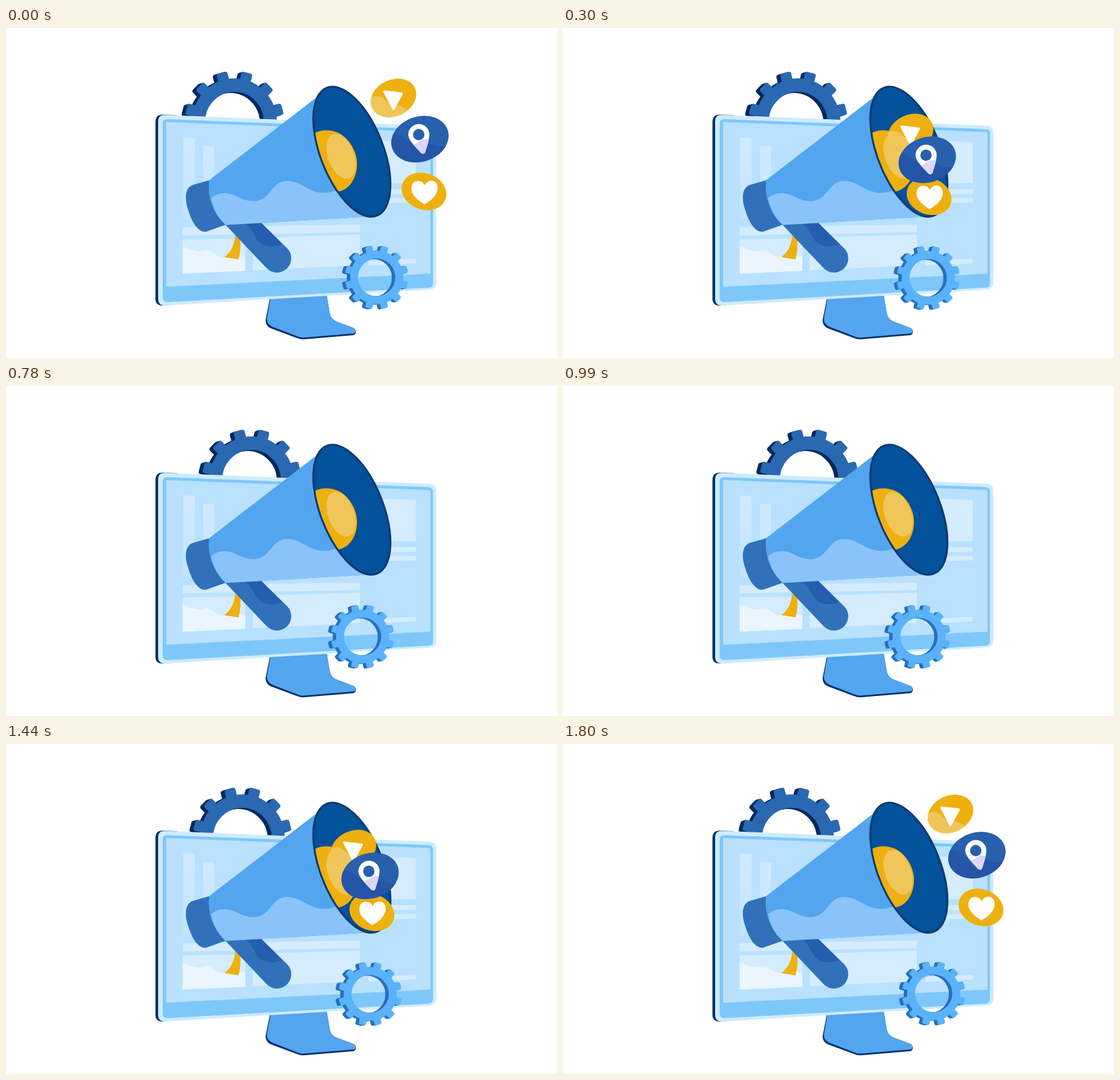
Write an HTML page that moves like this. It is 967 px wide and 579 px high and loops after 1.83 s.

```html
<!DOCTYPE html>
<html lang="en">
<head>
<meta charset="utf-8">
<title>Megaphone</title>
<style>
  html, body { margin: 0; width: 100%; height: 100%; overflow: hidden; background: #fff; }
  svg { display: block; width: 100%; height: 100%; }
</style>
</head>
<body>
<svg viewBox="0 0 967 579">
  <defs>
    <linearGradient id="fade" x2="0" y2="1">
      <stop offset="0" stop-color="#d0eafe"/>
      <stop offset="1" stop-color="#c1e4ff"/>
    </linearGradient>
    <clipPath id="playDisc"><ellipse cx="680" cy="122.7" rx="41.6" ry="32" transform="rotate(-25 680 122.7)"/></clipPath>
    <clipPath id="pinDisc"><ellipse cx="726.5" cy="195" rx="51.3" ry="39.7" transform="rotate(-18 726.5 195)"/></clipPath>
    <clipPath id="pinShape"><path id="pin" d="M706 188A18.5 18.5 0 0 1 743 186C743 196 738 210 736 217Q734 223 728 219C721 210 707 199 706 188Z"/></clipPath>
    <clipPath id="aboveHorn"><path d="M0 0H967V579H640V331L385 344H0Z"/></clipPath>
  </defs>

  <g id="bigGear"></g>

  <!-- stand -->
  <path d="M463 475L563 470L568 500Q570 511 580 515L609 526Q614 528 614 533Q614 538 609 539L525 546Q518 547 511 544L465 527Q456 523 455.500 513Z" fill="#00306b"/>
  <path d="M464 475L563 470L568 500Q570 511 580 515L609 526Q614 528 613.500 532Q613 536 609 536L525 543Q518 544 511 541L467 524Q457 519 458 509Z" fill="#52a5ee"/>

  <!-- monitor -->
  <path d="M275 152Q262.300 152 262.300 165V475Q262.300 487 275 487L300 485V153Z" fill="#00306b"/>
  <path d="M279 152.500L742 171.500Q755.300 172 755.300 184V446Q755.300 458 743 459L280 487Q267 487.500 267 475V164Q267 152 279 152.500Z" fill="#cdebfe"/>
  <path d="M283 160L742 177.500Q749.500 178 749.500 185V448Q749.500 455 742 455.500L283 481Q275 481 275 473V167Q275 160 283 160Z" fill="#7ec7fb"/>
  <path d="M281 165L742 182.500Q745 183 745 186V431L281 454Z" fill="#b9e1ff"/>
  <g fill="#d4ecfe">
    <path d="M311 192L331 193V334L311 335Z" fill="url(#fade)"/>
    <path d="M346 207L365 208V332L346 333Z" fill="url(#fade)"/>
    <path d="M640 197L719 200V272L640 273Z"/>
    <path d="M640 283L719 283V291L640 292ZM640 299L719 298V306L640 308Z"/>
    <path d="M310 349.500L621 345V358L310 364Z"/>
    <path d="M310 371L420 369V426L310 431ZM433 368L621 362.500V416L433 425Z"/>
    <path d="M636 409L719 405V413L636 417Z"/>
  </g>
  <path d="M310 384C318 383 321 390 328 390S337 394 345 391S359 391 364 395S376 404 386 401S405 398 420 402V426L310 431Z" fill="#eaf5ff"/>

  <g id="smallGear"></g>

  <!-- trigger and handle -->
  <path d="M402 365L411 368Q413 389 408 406L383 402Q400 390 402 365Z" fill="#edb00f"/>
  <path d="M384 344L447 341L494 387A24.800 24.800 0 0 1 457 421Z" fill="#3071ba"/>
  <path d="M419 343L447 341L485 379C472 385 455 385 445 376C433 365 436 354 419 343Z" fill="#255eae"/>

  <!-- bell interior -->
  <ellipse cx="607" cy="217" rx="55.2" ry="120.5" transform="rotate(-21.4 607 217)" fill="#02519b" stroke="#0e3b70" stroke-width="3.4"/>
  <path d="M542 184C559 176 580 179 594 191C608 204 617 222 616 241C615 265 602 284 583 287L550 260Z" fill="#edb00f"/>
  <ellipse cx="588" cy="225" rx="23" ry="41" transform="rotate(-20 588 225)" fill="#f0c65a"/>

  <!-- floating badges -->
  <g clip-path="url(#aboveHorn)">
    <g id="play">
      <g clip-path="url(#playDisc)">
        <path d="M630 80H730V165H630Z" fill="#edb00f"/>
        <path d="M636 123C646 117 660 119 666 127S682 134 690 136S703 145 710 144L702 165H636Z" fill="#f0c65a"/>
      </g>
      <path d="M664 111.500L694.500 115L680 142Z" fill="#fff" stroke="#fff" stroke-width="4" stroke-linejoin="round"/>
    </g>
    <g id="heart">
      <ellipse cx="733.500" cy="286.700" rx="40.300" ry="31.900" transform="rotate(20 733.5 286.700)" fill="#edb00f"/>
      <path d="M735 276C730 265 712 265 711.500 281C711 293 722 301 734 309.500C746 303 758 293 757.500 280C757 265 740 264 735 276Z" fill="#fff"/>
    </g>
    <g id="marker">
      <g clip-path="url(#pinDisc)">
        <path d="M670 150H780V240H670Z" fill="#2860ad"/>
        <path d="M670 188C685 182 694 188 702 195S722 205 735 203S758 211 772 207V240H670Z" fill="#2555a7"/>
      </g>
      <use href="#pin" fill="#fff"/>
      <path d="M705 201C714 206 720 204 725 200S735 194 745 197V225H705Z" fill="#dcd5fa" clip-path="url(#pinShape)"/>
      <circle cx="724.300" cy="187" r="10" fill="#2860ad"/>
    </g>
  </g>

  <!-- horn body -->
  <path d="M357 267L329 275C312 280 314 303 320 320C326 340 337 359 351 357.500L386 345L390 300Z" fill="#3071ba"/>
  <path d="M356.500 267L547.200 120A55.200 120.500 -21.400 0 0 639.800 331L385.500 345.500C363 325 353 296 356.500 267Z" fill="#52a5ee"/>
  <path d="M360 299C370 289 386 287 402 294C416 301 430 307 445 302C464 295 468 273 487 269C509 265 522 280 540 286C553 291 566 290 580 285Q607 331 639.800 331L385.500 345.500C371 332 364 317 360 299Z" fill="#89c3f9"/>
  <path d="M547.200 120A55.200 120.500 -21.400 0 0 639.800 331" fill="none" stroke="#0e3b70" stroke-width="3.4"/>
</svg>
<script>
const FRAME = 30, FRAMES = 61, HALF = 30;
const byId = id => document.getElementById(id);

// One face of a gear: a thick ring with twelve rounded teeth.
function gearFace(g, dx, dy, color) {
  let teeth = '';
  for (let i = 0; i < 12; i++) {
    teeth += `<rect x="${-g.tooth / 2}" y="${-g.tip}" width="${g.tooth}" height="${g.tip - g.hole - 4}"
      rx="${g.round}" transform="rotate(${15 + i * 30})"/>`;
  }
  return `<g transform="translate(${g.x + dx} ${g.y + dy}) scale(${g.squeeze} 1)" fill="${color}">
    <circle r="${(g.rim + g.hole) / 2}" fill="none" stroke="${color}" stroke-width="${g.rim - g.hole}"/>${teeth}</g>`;
}

function buildGear(id, g) {
  let faces = '';
  for (let d = g.depth; d > 0; d--) faces += gearFace(g, -d, d * g.drop, g.side);
  byId(id).innerHTML = faces + gearFace(g, 0, 0, g.front);
}

buildGear('bigGear', { x: 401, y: 165, squeeze: .972, rim: 76.5, hole: 53, tip: 89.5, tooth: 20,
  round: 4, depth: 7, drop: .3, front: '#2a68b2', side: '#00295e' });
buildGear('smallGear', { x: 650.5, y: 437.5, squeeze: .99, rim: 47, hole: 33, tip: 56, tooth: 13,
  round: 3, depth: 6, drop: .15, front: '#5ab2fb', side: '#2870bb' });

function move(id, dx, dy) {
  byId(id).setAttribute('transform', `translate(${dx.toFixed(2)} ${dy.toFixed(2)})`);
}

function draw(ms) {
  const frame = Math.floor(ms / FRAME) % FRAMES;
  const swing = HALF - Math.abs(frame - HALF);
  move('bigGear', swing * 1.15, 0);
  move('smallGear', swing * -.95, swing * .08);

  // Badges fly into the horn, wait inside it, and return a little faster.
  const back = Math.max(0, (57 - frame) * 1.115);
  const inward = Math.min(24, frame <= HALF ? frame : back);
  move('play', inward * -7, inward * 6.15);
  move('marker', inward * -8.72, inward * 3.62);
  move('heart', inward * -9.1, inward * .85);
}

const start = performance.now();
function tick() {
  draw(performance.now() - start);
  requestAnimationFrame(tick);
}
tick();
</script>
</body>
</html>
```
